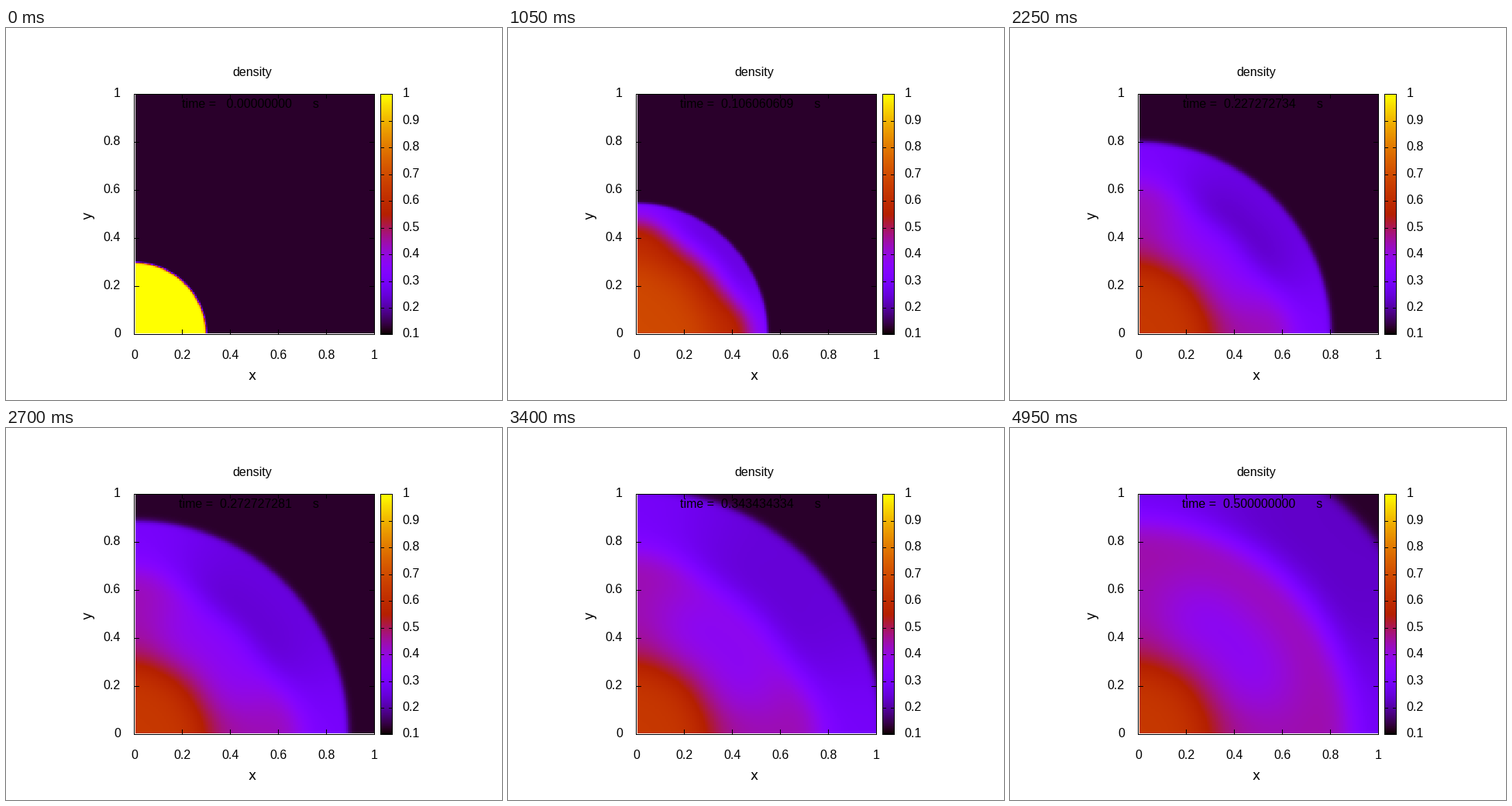
Animation of 640 by 480 pixels, one loop 5 s. Source, as a matplotlib script:

```python
import math

import numpy as np
import matplotlib.pyplot as plt
from matplotlib.animation import FuncAnimation
from matplotlib.colors import ListedColormap
from matplotlib.patches import Rectangle

W, H, DPI = 640, 480, 100
FRAMES, INTERVAL = 100, 50
T_END = 0.5
AMBIENT = 0.125
LEFT, RIGHT, TOP, BOTTOM = 165, 475, 85, 395
SIDE = RIGHT - LEFT
N = 199

plt.rcParams["font.family"] = "Liberation Sans"

axis = 0.005 + (np.arange(N) + 0.5) * 0.995 / N
gx, gy = np.meshgrid(axis, axis)
radius = np.hypot(gx, gy)
# 0 along the axes, 1 along the diagonal
diag = 1 - np.cos(2 * np.arctan2(gy, gx)) ** 4


def inside(edge, width):
    """Soft step: 1 within the edge, 0 beyond it."""
    return 0.5 - 0.5 * np.tanh((radius - edge) / width)


def fade(t, tau):
    return math.exp(-(t / tau) ** 2)


def density(t):
    # Values of the core, the ring around it and the gas behind the shock
    core = 0.645 + 0.355 * fade(t, 0.075)
    ring = 0.45 + 0.55 * fade(t, 0.092)
    shell = 0.33 - 0.1 * t - 0.05 * diag * (1 - fade(t, 0.15))

    # The shock runs ahead of the contact; both slow down
    shock = 0.301 + 2.4 * t - 0.89 * t * t
    contact = (0.301 + 1.75 * t - 1.15 * t * t
               - 0.09 * diag * math.sin(2 * math.pi * t))

    rho = shell + (ring - shell) * inside(contact, min(0.004 + 0.5 * t, 0.07))
    rho += (core - ring) * inside(0.295, 0.07 + 0.08 * t)
    hollow = (0.015 + 0.065 * diag) * (1 - fade(t, 0.1))
    rho -= hollow * np.exp(-0.5 * ((radius - 0.44 - 0.2 * t) / 0.13) ** 2)
    return AMBIENT + (rho - AMBIENT) * inside(shock, 0.004 + 0.04 * t)


def time_label(t):
    v = float(np.float32(t))
    if v == 0:
        number = "  0.00000000    "
    elif v < 0.1:
        number = f"  {v:.8E}"
    else:
        number = f" {v:.9f}    "
    return f"time = {number}  s"


# Square root, cube and sine curves for red, green and blue
u = np.linspace(0, 1, 512)
cmap = ListedColormap(np.column_stack(
    [np.sqrt(u), u ** 3, np.clip(np.sin(2 * np.pi * u), 0, 1)]))

fig = plt.figure(figsize=(W / DPI, H / DPI), dpi=DPI, facecolor="white")
ax = fig.add_axes([0, 0, 1, 1])
ax.axis("off")


def box(x, y, w, h):
    ax.add_patch(Rectangle((x, y), w, h, fc="black", lw=0,
                           antialiased=False, zorder=3))


def frame(x0, y0, x1, y1):
    for y in (y0, y1):
        box(x0, y, x1 - x0 + 1, 1)
    for x in (x0, x1):
        box(x, y0, 1, y1 - y0 + 1)


def label(x, y, s, ha="center", va="baseline", px=16, **kw):
    return ax.text(x, y, s, ha=ha, va=va, fontsize=px * 72 / DPI,
                   color="black", zorder=4, **kw)


image = ax.imshow(density(0), cmap=cmap, vmin=0.1, vmax=1, origin="lower",
                  extent=(LEFT + 2, RIGHT, BOTTOM - 1, TOP + 1),
                  interpolation="nearest", aspect="auto")
ax.imshow(u[:, None], cmap=cmap, vmin=0, vmax=1, origin="lower",
          extent=(484, 498, BOTTOM, TOP + 1),
          interpolation="nearest", aspect="auto")
ax.set_xlim(0, W)
ax.set_ylim(H, 0)

frame(LEFT, TOP, RIGHT, BOTTOM)
for k in range(6):
    d = k * SIDE // 5
    x, y = LEFT + d, BOTTOM - d
    label(x + 0.5, 427, f"{k / 5:g}")
    label(148, y + 4, f"{k / 5:g}", ha="right")
    if 0 < k < 5:
        box(x, BOTTOM - 6, 1, 6)
        box(x, TOP, 1, 6)
        box(LEFT, y, 7, 1)
        box(RIGHT - 6, y, 7, 1)

frame(483, TOP, 498, BOTTOM)
for k in range(1, 11):
    y = BOTTOM - (k - 1) * SIDE // 9
    label(511.5, y + 4, f"{k / 10:g}", ha="left")
    if 1 < k < 10:
        box(483, y, 5, 1)
        box(494, y, 5, 1)

label(318, 62, "density")
label(318, 454, "x", px=17, family="DejaVu Sans")
label(105, 242, "y", px=17, va="center", rotation=90, family="DejaVu Sans")
clock = label(403.5, 103, time_label(0), ha="right")


def update(i):
    t = T_END * i / (FRAMES - 1)
    image.set_data(density(t))
    clock.set_text(time_label(t))
    return image, clock


anim = FuncAnimation(fig, update, frames=FRAMES, interval=INTERVAL,
                     repeat=True, repeat_delay=0, blit=False)
plt.show()
```
